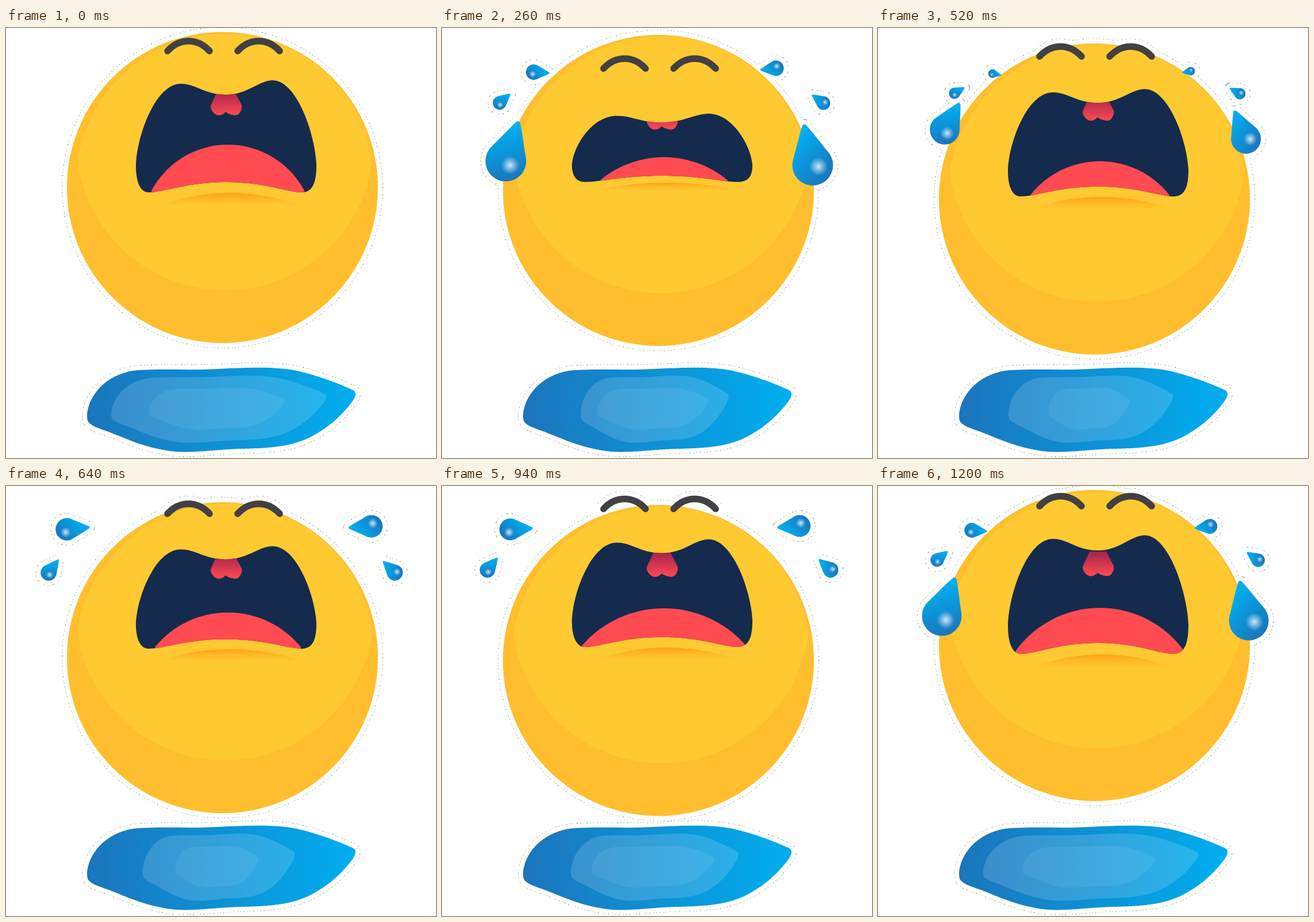
An HTML page that plays this animation: 748 by 748 pixels, repeating every 1.22 s.

```html
<!DOCTYPE html>
<html lang="en">
<head>
<meta charset="utf-8">
<title>Crying face</title>
<style>
html, body { margin: 0; width: 100%; height: 100%; overflow: hidden; background: #fff; }
svg { display: block; width: 100vw; height: 100vh; }
#edge *, #halo * { fill: none; stroke-linejoin: round; vector-effect: non-scaling-stroke; }
#edge * { stroke: #555; stroke-width: 17.2px; stroke-dasharray: 1.5 3 1 6 2 4; }
#halo * { stroke: #fff; stroke-width: 16px; }
#edge .brow { stroke-width: 27.7px; }
#halo .brow { stroke-width: 26.5px; stroke-linecap: round; }
#body .brow { fill: none; stroke: #414042; stroke-width: 11.5px; stroke-linecap: round; }
</style>
</head>
<body>
<svg viewBox="0 0 748 748">
  <defs>
    <linearGradient id="water">
      <stop stop-color="#1b75bc"/><stop offset="1" stop-color="#00aeef"/>
    </linearGradient>
    <linearGradient id="tear" gradientUnits="userSpaceOnUse" x1="1.3" y1="-.7" x2="-.7" y2=".75">
      <stop stop-color="#00aeef"/><stop offset="1" stop-color="#1b75bc"/>
    </linearGradient>
    <radialGradient id="shine">
      <stop stop-color="#fff" stop-opacity=".8"/>
      <stop offset=".35" stop-color="#fff" stop-opacity=".5"/>
      <stop offset="1" stop-color="#fff" stop-opacity="0"/>
    </radialGradient>
    <linearGradient id="flesh" x2="0" y2="1">
      <stop stop-color="#a3234f"/><stop offset="1" stop-color="#ff4951"/>
    </linearGradient>
    <linearGradient id="shade" x2="0" y2="1">
      <stop stop-color="#ff9f16"/><stop offset="1" stop-color="#ffb923" stop-opacity="0"/>
    </linearGradient>
    <clipPath id="inMouth"><path data-part="mouth"/></clipPath>
  </defs>
  <g id="edge"></g>
  <g id="halo"></g>
  <g id="body">
    <path data-part="pool" fill="url(#water)"/>
    <path data-part="poolMid" fill="#fff" fill-opacity=".15"/>
    <path data-part="poolIn" fill="#fff" fill-opacity=".07"/>
    <g data-part="face">
      <circle cx="376.5" cy="277.5" r="270.5" fill="#ffbe2d"/>
      <path d="M124.5 233A259 259 0 0 1 637.5 233A259 259 0 0 1 124.5 233Z" fill="#ffc932"/>
    </g>
    <path data-part="chin" fill="url(#shade)"
      d="M264 312C340 281 430 280 515 310C440 308 340 310 264 312Z"/>
    <path data-part="mouth" fill="#142b4d"/>
    <g clip-path="url(#inMouth)">
      <path data-part="tongue" fill="#ff4b51"/>
      <path data-part="uvula" fill="url(#flesh)"
        d="M-15-43H14L26-20Q29-14 25-7Q21 2 11-1Q4-2-1-6Q-5-2-8-1Q-17 2-23-6Q-29-13-26-19Z"/>
    </g>
  </g>
</svg>
<script>
const LOOP = 1220, STEP = 20, BURST = 315;
const $ = id => document.getElementById(id);
const parts = name => document.querySelectorAll(`[data-part="${name}"]`);

const POOL = "M141 674C143 640 172 604 222 596C265 592 320 596 370 593C430 590 470 589 505 596" +
  "C545 605 580 619 604 630C610 634 609 639 603 649C583 676 556 700 520 716C485 730 450 731 405 732" +
  "C360 734 330 739 295 737C250 733 215 717 180 703C160 696 148 692 143 685Q141 682 141 674Z";
const MOUTH = "M304 97C331 97 345 116 383 116C420 116 440 91 464 91C506 91 538 186 540 238" +
  "C540 272 532 286 514 286C490 286 450 268 383 268C315 268 275 286 248 286" +
  "C234 286 226 268 226 240C227 188 260 97 304 97Z";
const DROP = "M.49-.87C1-.6 1.6-.33 2-.09Q2.1 0 2 .09C1.6 .33 1 .6 .49 .87A1 1 0 1 1 .49-.87Z";
const BROW = "M281 40C302 17 333 17 354 40M403 40C424 17 455 17 476 40";

const mix = (a, b, u) => a + (b - a) * u;
const bezier = (a, b, c, u) => mix(mix(a, b, u), mix(b, c, u), u);

// Eases through [time, value] keys and holds the last one
function ease(t, ...keys) {
  const i = keys.findIndex(key => key[0] > t);
  if (i < 0) return keys[keys.length - 1][1];
  const [t0, v0] = keys[i - 1], [t1, v1] = keys[i], u = (t - t0) / (t1 - t0);
  return mix(v0, v1, u * u * (3 - 2 * u));
}

// Each tear follows a three-point curve, turns evenly and grows up to a limit
const STREAMS = [
  { start: 45, span: 210, life: [-.06, 1.15], size: [5.7, 34.5], power: 1.3, limit: 38, sides: [
    { path: [[201, 74], [111, 114], [111, 226]], turn: [-28, -71] },
    { path: [[539, 100], [648, 141], [645, 234]], turn: [-142, -103] }] },
  { start: 130, span: 180, life: [0, 1.15], size: [4.5, 13.5], power: .6, limit: 14, sides: [
    { path: [[194, 92], [110, 117], [79, 146]], turn: [-15, -50] },
    { path: [[549, 93], [669, 118], [676, 146]], turn: [-160, -138] }] },
  { start: 160, span: 200, life: [0, 1.15], size: [2.5, 24.5], power: 1, limit: 19.5, sides: [
    { path: [[228, 82], [168, 75], [74, 75]], turn: [16, -9] },
    { path: [[520, 83], [567, 62], [670, 73]], turn: [-190, -182] }] }
];

function add(parent, tag, attrs) {
  const el = document.createElementNS("http://www.w3.org/2000/svg", tag);
  for (const k in attrs) el.setAttribute(k, attrs[k]);
  return parent.appendChild(el);
}
function place(els, transform) {
  els.forEach(el => el.setAttribute("transform", transform));
}

parts("mouth").forEach(el => el.setAttribute("d", MOUTH));
["pool", "poolMid", "poolIn"].forEach(name => parts(name)[0].setAttribute("d", POOL));
const rings = [$("edge"), $("halo")];
for (const g of rings) {
  add(g, "path", { d: POOL });
  add(g, "circle", { cx: 376.5, cy: 277.5, r: 270.5, "data-part": "face" });
}
const brows = [...rings, $("body")].map(g => add(g, "path", { d: BROW, class: "brow" }));

const tears = [];
for (const stream of STREAMS) {
  for (let burst = 0; burst < LOOP; burst += BURST) {
    for (const side of stream.sides) {
      const els = rings.map(g => add(g, "path", { d: DROP }));
      const body = add($("body"), "g", {});
      add(body, "path", { d: DROP, fill: "url(#tear)" });
      add(body, "circle", { cx: -.13, cy: .26, r: .45, fill: "url(#shine)" });
      tears.push({ ...stream, ...side, els: [...els, body], start: burst + stream.start });
    }
  }
}

const el = {};
for (const name of ["face", "mouth", "chin", "tongue", "uvula", "poolMid", "poolIn"]) el[name] = parts(name);

function drawTear({ els, start, span, life, size, power, limit, path, turn }, t) {
  const u = (t - start) / span, live = u >= life[0] && u < life[1];
  els.forEach(e => e.setAttribute("display", live ? "inline" : "none"));
  if (!live) return;
  const [x, y] = [0, 1].map(i => bezier(path[0][i], path[1][i], path[2][i], u));
  const r = Math.min(limit, mix(...size, Math.max(u, 0) ** power));
  place(els, `translate(${x} ${y}) rotate(${mix(...turn, u)}) scale(${r})`);
}

function drawMouth(t) {
  const top = ease(t, [0, 97], [330, 160], [520, 112], [1200, 92]);
  const low = ease(t, [0, 286], [160, 262], [520, 293], [760, 273], [1200, 292]);
  const k = (low - top) / 189;
  place(el.mouth, `translate(0 ${top}) scale(1 ${k}) translate(0 -97)`);
  place(el.chin, `translate(0 ${low + 1}) scale(1 ${k}) translate(0 -288)`);
  place(el.uvula, `translate(383 ${152 + .42 * (top - 97) + .006 * t})`);

  const tip = ease(t, [0, 203], [430, 236], [760, 213], [1200, 212]);
  const half = ease(t, [0, 133], [160, 110], [1200, 148]);
  const base = low - 3, rise = base - tip;
  const r = (half * half + rise * rise) / (2 * rise);
  el.tongue[0].setAttribute("d",
    `M${386 - half} ${base}A${r} ${r} 0 0 1 ${386 + half} ${base}v20h${-2 * half}Z`);
}

function drawPool(t) {
  const mid = ease(t, [0, 187], [220, 128], [520, 143], [760, 122], [1200, 187]);
  const inner = 94 + 24 * Math.cos(2 * Math.PI * t / 1120);
  place(el.poolMid, `translate(370 605) scale(${mid / 233.5} .796) translate(-374.5 -591)`);
  place(el.poolIn, `translate(367 626) scale(${inner / 233.5} .497) translate(-374.5 -591)`);
}

function draw(t) {
  place(el.face, `translate(0 ${ease(t, [0, 0], [160, 10], [360, 0], [520, 20], [940, 26], [1200, 0])})`);
  place(brows, `translate(0 ${ease(t, [0, 0], [300, 32], [540, 9], [1200, -5])})`);
  drawMouth(t);
  drawPool(t);
  tears.forEach(tear => drawTear(tear, t));
}

const begin = performance.now();
function tick() {
  const t = (performance.now() - begin) % LOOP;
  draw(Math.floor(t / STEP) * STEP);
  requestAnimationFrame(tick);
}
tick();
</script>
</body>
</html>
```
